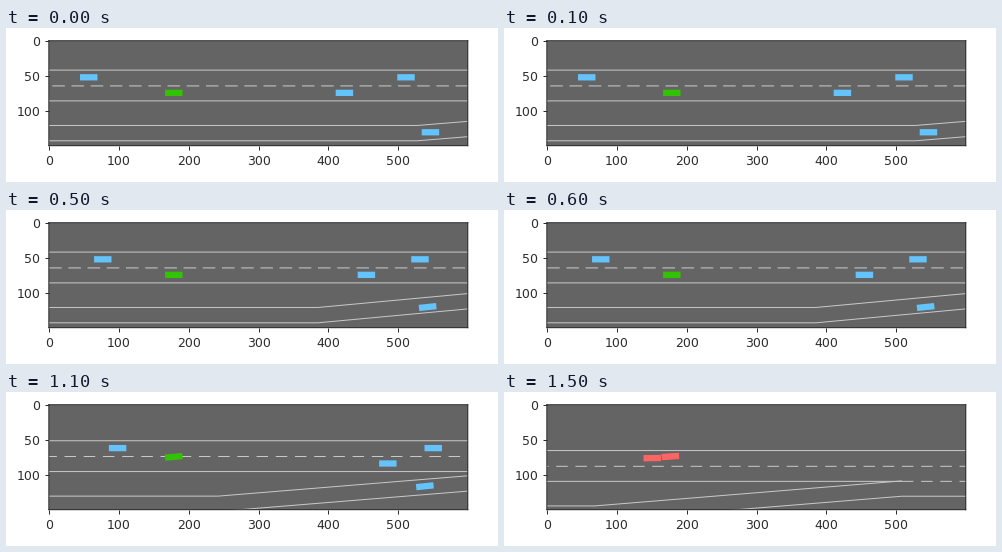
Animation, 492 px wide and 154 px high, one loop 3300 ms. Source, as a matplotlib script:

```python
import numpy as np
import matplotlib.pyplot as plt
from matplotlib.animation import FuncAnimation
from matplotlib.patches import Rectangle

W, H, DPI = 492, 154, 90
PX = 72 / DPI                      # points per pixel
ROAD, LINE, SOFT, INK = "#646464", "#c8c8c8", "#a0a0a0", "#2c2c2c"
BLUE, GREEN, RED = "#64c3fa", "#32c300", "#ff6464"
CAR_L, CAR_W = 25, 9
PERIOD = 27.5
RAMP_L, RAMP_RISE = 440, 35.75

plt.rcParams["font.family"] = "DejaVu Sans"
fig = plt.figure(figsize=((W + 1e-6) / DPI, (H + 1e-6) / DPI), dpi=DPI,
                 facecolor="white")
ax = fig.add_axes([42.8 / W, (H - 117.7) / H, 419 / W, 105 / H])
ax.set_facecolor(ROAD)
ax.set_xticks(range(0, 501, 100))
ax.set_yticks(range(0, 101, 50))
ax.tick_params(labelsize=10, color=INK, labelcolor=INK)
ax.tick_params(axis="x", pad=4.1)
for spine in ax.spines.values():
    spine.set(color=INK, snap=False)


def line(xs, ys, color=LINE, width=1):
    return ax.plot(xs, ys, color=color, lw=width * PX, snap=False,
                   solid_capstyle="butt")[0]


def dashes(y, start, length=16.5, **style):
    return [line([x, x + length], [y, y], **style)
            for x in np.arange(start, 600, PERIOD)]


def road(ramp_x, dy, slope=RAMP_RISE / RAMP_L, soft=False):
    """Two main lanes plus the merging ramp that starts at ramp_x."""
    top, mid, low = 41.5 + dy, 64 + dy, 85.5 + dy
    end, rise = ramp_x + RAMP_L, slope * RAMP_L
    style = dict(color=SOFT, width=1.7, length=18) if soft else {}
    parts = [line([-1, 601], [top, top]), line([-1, end], [low, low])]
    parts += dashes(mid, ramp_x % PERIOD - PERIOD, **style)
    parts += dashes(low, end)
    for y in (120.6 + dy, 142.5 + dy):
        parts.append(line([-1, ramp_x, end], [y, y, y - rise]))
    parts.append(line([end, end + 600], [y - rise, y - rise]))
    return parts


def car(x, y, color=BLUE, angle=0):
    box = Rectangle((x - CAR_L / 2, y - CAR_W / 2), CAR_L, CAR_W, angle=angle,
                    rotation_point="center", fc=color, ec="none", zorder=3,
                    snap=False)
    return ax.add_patch(box)


cruise = road(527, 0, soft=True) + [
    car(56.7, 51.8), car(511, 51.8), car(422.8, 74), car(546, 130.3),
    car(178.5, 74, GREEN)]

approach = road(385, 0, slope=0.0925, soft=True) + [
    car(76.8, 51.8), car(531, 51.8), car(454.3, 74), car(542, 120, angle=-6),
    car(178.5, 74, GREEN)]

lane_change = road(242, 9.5) + [
    car(98, 61.5), car(550, 61.5), car(485, 83.5), car(538, 116, angle=-6),
    car(178.5, 74, GREEN, -5)]

crash = road(68, 23.5) + [
    car(150.5, 75.8, RED, -1), car(176.4, 73.5, RED, -4)]

scenes = [cruise, approach, lane_change, crash]
starts = [0, 5, 11, 15]
BLANK = 4

ax.set_xlim(-0.5, 599.5)
ax.set_ylim(149.5, -0.5)


def update(i):
    current = max(k for k, s in enumerate(starts) if i >= s)
    for k, parts in enumerate(scenes):
        for p in parts:
            p.set_visible(k == current)
    ax.set_visible(i != BLANK)
    return []


anim = FuncAnimation(fig, update, frames=33, interval=100, repeat=True,
                     repeat_delay=0, blit=False)
plt.show()
```
